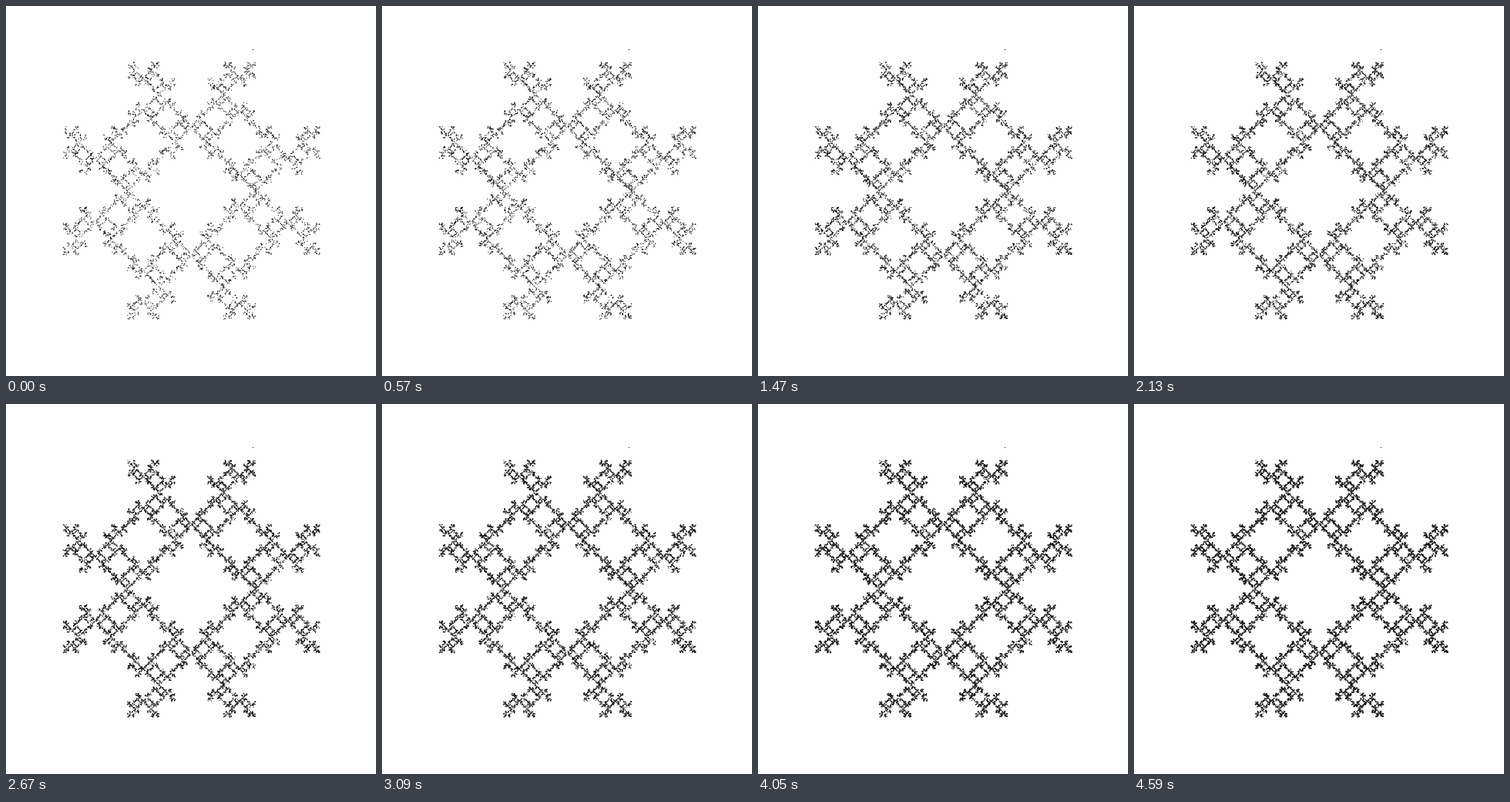
These frames come from a looping animation (480x480 px, 5430 ms). An HTML page with a canvas:

```html
<!DOCTYPE html>
<html lang="en">
<head>
<meta charset="utf-8">
<title>Chaos game</title>
<style>
  html, body { margin: 0; width: 100%; height: 100%; overflow: hidden; background: #fefefe; }
  canvas { display: block; width: 480px; height: 480px; }
</style>
</head>
<body>
<canvas id="stage" width="480" height="480"></canvas>
<script>
const ctx = document.getElementById('stage').getContext('2d');
const LOOP = 5430;
const START = { x: 320, y: 56 };
const CENTER = { x: 240, y: 239 };
const RADIUS = 250;
const FIRST = 6000;  // dots at the start of the loop
const BATCH = 500;   // dots added per step

// Step lengths: 0 is 120 ms, 1 is 150 ms.
const GAPS = '0111001010010001010111000111010101';
const steps = [0];
for (const g of GAPS) steps.push(steps[steps.length - 1] + (g === '1' ? 150 : 120));

function seeded(seed) {
  return () => {
    seed = (seed + 0x6D2B79F5) | 0;
    let t = Math.imul(seed ^ (seed >>> 15), 1 | seed);
    t = (t + Math.imul(t ^ (t >>> 7), 61 | t)) ^ t;
    return ((t ^ (t >>> 14)) >>> 0) / 4294967296;
  };
}

// Jump halfway to a random corner of a diamond, never the same corner twice in a row.
function chaosGame(count) {
  const random = seeded(11);
  const corners = [[0, -1], [1, 0], [0, 1], [-1, 0]];
  const dots = [[START.x, START.y]];
  let { x, y } = START;
  let corner = 0;
  for (let i = -12; dots.length < count; i++) {
    corner = (corner + 1 + Math.floor(random() * 3)) % 4;
    const [cx, cy] = corners[corner];
    x = (x + CENTER.x + cx * RADIUS) / 2;
    y = (y + CENTER.y + cy * RADIUS) / 2;
    if (i >= 0) dots.push([x, y]);
  }
  return dots;
}

const dots = chaosGame(FIRST + BATCH * GAPS.length);
let shown = 0;

// Dots keep their fractional places, so their soft edges build up to black.
function show(count) {
  if (count < shown) shown = 0;
  if (shown === 0) {
    ctx.fillStyle = '#fefefe';
    ctx.fillRect(0, 0, 480, 480);
  }
  ctx.fillStyle = '#000';
  for (; shown < count; shown++) ctx.fillRect(dots[shown][0], dots[shown][1], 1, 1);
}

function frame() {
  const t = performance.now() % LOOP;
  const step = steps.filter(s => s <= t).length - 1;
  show(FIRST + BATCH * step);
  requestAnimationFrame(frame);
}
frame();
</script>
</body>
</html>
```
